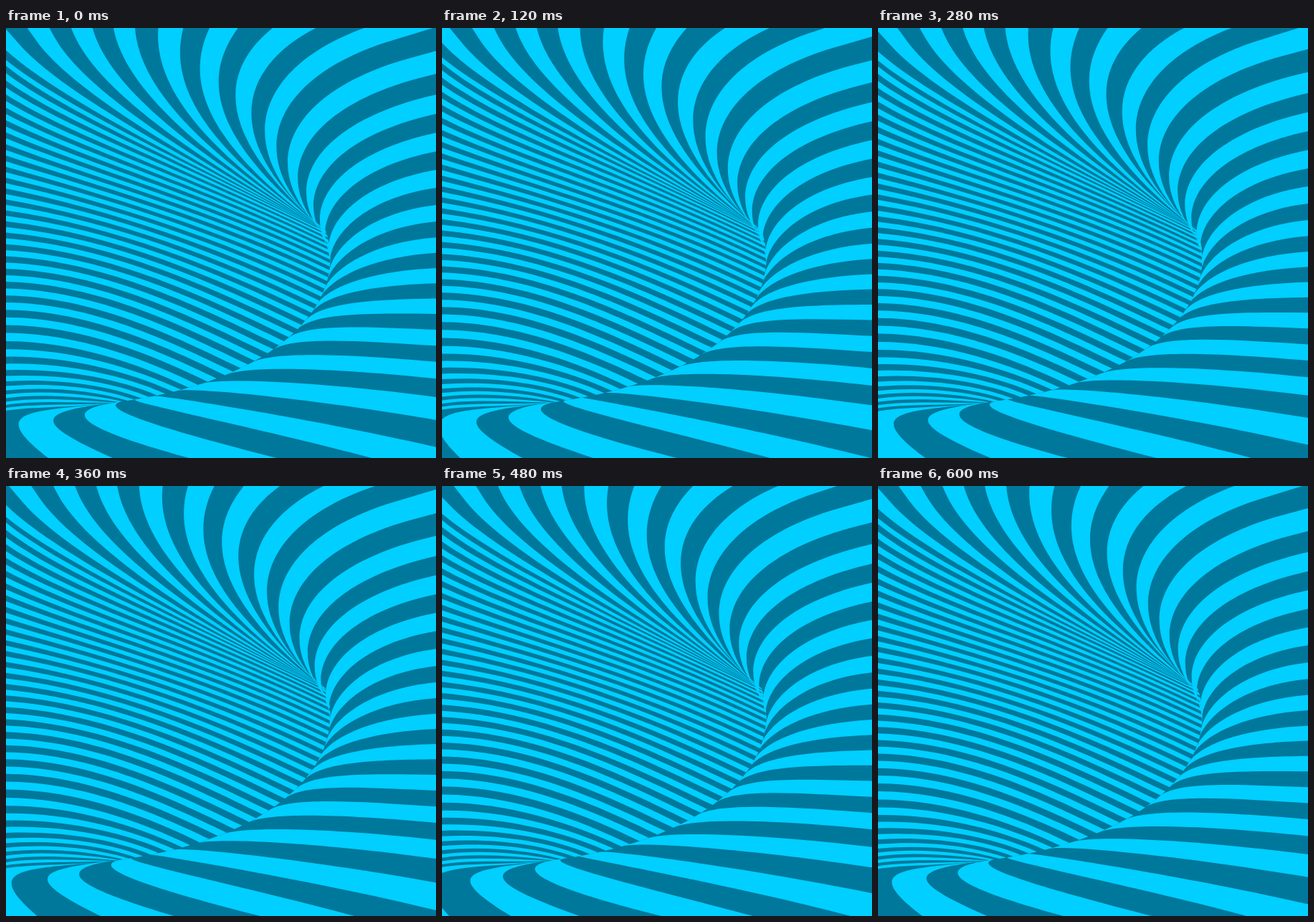
Animation of 600x600 px, one loop 0.64 s. Source, as an HTML page with a canvas:

```html
<!DOCTYPE html>
<html lang="en">
<head>
<meta charset="utf-8">
<title>Striped tunnel</title>
<style>
  html, body { margin: 0; width: 100%; height: 100%; overflow: hidden; background: #00789b; }
  canvas { display: block; }
</style>
</head>
<body>
<canvas id="stage" width="600" height="600"></canvas>
<script>
const LIGHT = '#00cfff', DARK = '#00789b';
const LOOP = 640, STEP = 40, PERIOD = 610;
const FIRST = -32, COUNT = 52;

const ctx = document.getElementById('stage').getContext('2d');

// The fold where the near wall hides the far wall, from top (0) to bottom (1).
function fold(t) {
  const r = 1 - t;
  const mix = (a, b, c, d) => r * r * r * a + 3 * r * r * t * b + 3 * r * t * t * c + t * t * t * d;
  return [mix(446, 480, 380, 138), mix(283, 382, 498, 524)];
}

// Every stripe edge is a Bezier from the rim to the fold, kept as
// [s, rim x, rim y, handle x, handle y, offset x, offset y, fold position];
// the offset places the second handle relative to the fold point.

// Far wall: edges climb the left side and grow steeper towards the top.
function farEdge(s) {
  const u = (s + 25) / 23;
  const w = .82 * (1 - u) ** 1.35;
  const y = 437 - 532 * u + 359 * u * u - 233 * u ** 3;
  const [fx, fy] = fold(w);
  const chord = Math.hypot(fx, fy - y);
  const start = chord * (.36 - .2 * u ** 3), tilt = .75 * u * u;
  const end = chord * (.29 + .19 * u * u);
  return [s, 0, y, start * Math.cos(tilt), y + start * Math.sin(tilt),
    -end * Math.cos(.45), -end * Math.sin(.45), w];
}

// Near wall: edges leave along the fold, upwards for a positive reach.
function nearEdge(s, w, reach, ...rim) {
  const [ax, ay] = fold(w - .01), [bx, by] = fold(w + .01);
  const k = reach / Math.hypot(ax - bx, ay - by);
  return [s, ...rim, (ax - bx) * k, (ay - by) * k, w];
}

const guides = [[-29, -100, 530, -20, 495, -75, -22, .955]];
for (let s = -25; s <= -2; s++) guides.push(farEdge(s));
guides.push(
  [1, 150, 0, 165, 82, -178, -107, 0],
  [3, 284, 0, 250, 72, -173, -125, 0],
  [4, 372, 0, 310, 50, -173, -147, 0],
  [5, 500, 0, 360, 50, -147, -122, 0],
  [7, 600, 93, 435, 130, -73, -78, .05],
  nearEdge(10, .19, 35, 600, 247, 505, 258),
  nearEdge(14, .51, 35, 600, 421, 510, 418),
  nearEdge(16, .79, 30, 600, 515, 440, 494),
  nearEdge(17.5, .94, -15, 510, 600, 370, 562),
  nearEdge(18.5, .97, -95, 255, 600, 110, 560),
  nearEdge(20, 1, -120, -15, 615, -100, 515)
);
guides.unshift([FIRST, ...guides[guides.length - 1].slice(1)]);

// Smooth blend of the guides around position s, as four Bezier points.
function edgeAt(s) {
  s = FIRST + ((s - FIRST) % COUNT + COUNT) % COUNT;
  let i = 0;
  while (i < guides.length - 2 && guides[i + 1][0] <= s) i++;
  const a = guides[i], b = guides[i + 1];
  const before = guides[Math.max(i - 1, 0)];
  const after = guides[Math.min(i + 2, guides.length - 1)];
  const h = b[0] - a[0], u = (s - a[0]) / h;
  const ease = u * u * (3 - 2 * u);
  const [, x0, y0, x1, y1, dx, dy, w] = a.map((v, k) => {
    const ma = (b[k] - before[k]) / (b[0] - before[0]) * h;
    const mb = (after[k] - v) / (after[0] - a[0]) * h;
    return v + (b[k] - v) * ease + u * (1 - u) * ((1 - u) * ma - u * mb);
  });
  const [fx, fy] = fold(w);
  return [x0, y0, x1, y1, fx + dx, fy + dy, fx, fy];
}

// A point past the rim, straight on from the outer end.
function beyond([x0, y0, x1, y1]) {
  const k = 150 / Math.hypot(x0 - x1, y0 - y1);
  return [x0 + (x0 - x1) * k, y0 + (y0 - y1) * k];
}

function drawStripe(s) {
  const a = edgeAt(s), b = edgeAt(s + .5);
  ctx.beginPath();
  ctx.moveTo(...beyond(a));
  ctx.lineTo(a[0], a[1]);
  ctx.bezierCurveTo(...a.slice(2));
  for (let j = 1; j < 4; j++) ctx.lineTo(...edgeAt(s + j / 8).slice(6));
  ctx.lineTo(b[6], b[7]);
  ctx.bezierCurveTo(b[4], b[5], b[2], b[3], b[0], b[1]);
  ctx.lineTo(...beyond(b));
  ctx.fill();
}

function draw() {
  const t = Math.floor(performance.now() % LOOP / STEP) * STEP;
  ctx.fillStyle = DARK;
  ctx.fillRect(0, 0, 600, 600);
  ctx.fillStyle = LIGHT;
  for (let n = 0; n < COUNT; n++) drawStripe(FIRST + n + t / PERIOD);
  requestAnimationFrame(draw);
}
draw();
</script>
</body>
</html>
```
